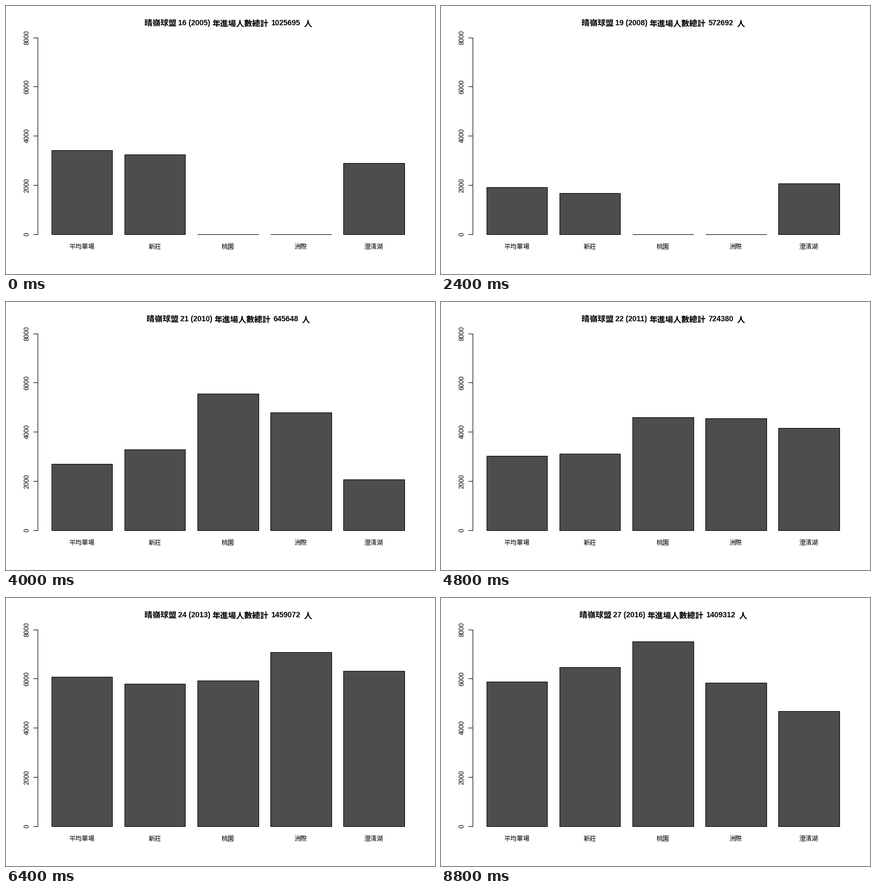
A matplotlib script that plays this animation: 800x500 px, repeating every 9600 ms.

```python
import math

import matplotlib.pyplot as plt
import numpy as np
from matplotlib.animation import FuncAnimation
from matplotlib.patches import Rectangle

WIDTH, HEIGHT, DPI = 800, 500, 100
PX = 72 / DPI  # points per pixel
LATIN = "Liberation Sans"
CJK = "Noto Sans CJK JP"
LEAGUE = "晴嶺球盟"
FIRST_YEAR, FIRST_SEASON = 2005, 16

TOTALS = [1025695, 706858, 655461, 572692, 899491, 645648,
          724380, 583805, 1459072, 1224730, 1326895, 1409312]

# Crowd at each park relative to the season average, at a few key years.
# A shorter list means the park opened later.
KEY_YEARS = [2005, 2008, 2010, 2012, 2013, 2014, 2016]
PARKS = {
    "新莊": [0.949, 0.878, 1.222, 0.842, 0.953, 0.811, 1.101],
    "桃園": [2.064, 0.976, 0.974, 1.224, 1.279],
    "洲際": [1.781, 1.235, 1.164, 0.905, 0.994],
    "澄清湖": [0.848, 1.083, 0.769, 1.987, 1.039, 0.862, 0.797],
}

LINE = 14.4  # height of one margin line
LEFT, RIGHT = 4.1 * LINE, WIDTH - 2.1 * LINE
TOP, BOTTOM = 4.1 * LINE, HEIGHT - 5.1 * LINE
UNIT = (RIGHT - LEFT) / 6.264  # width of one bar


def y_of(value):
    return math.floor(BOTTOM - value * (BOTTOM - TOP) / 8000)


def bar_edges(index):
    left = LEFT + UNIT * (0.232 + 1.2 * index)
    return math.floor(left), math.floor(left + UNIT)


def crowds(year, total):
    """Season average followed by the crowd at each park."""
    average = total / (300 if year < 2009 else 240)
    ratios = [np.interp(year, KEY_YEARS[-len(park):], park, left=0)
              for park in PARKS.values()]
    return [average] + [average * ratio for ratio in ratios]


fig = plt.figure(figsize=(WIDTH / DPI, HEIGHT / DPI), dpi=DPI, facecolor="white")
ax = fig.add_axes([0, 0, 1, 1])
ax.set(xlim=(0, WIDTH), ylim=(HEIGHT, 0))
ax.axis("off")


def write(x, y, text, size, font, **style):
    return ax.text(x, y, text, fontsize=size * PX, family=font,
                   va="baseline", color="black", **style)


def stroke(xs, ys):
    # Snapping moves whole coordinates to pixel centres.
    ax.plot(xs, ys, color="black", lw=PX, snap=True,
            solid_capstyle="projecting")


axis_x = math.floor(LEFT)
stroke([axis_x, axis_x], [y_of(8000), y_of(0)])
for tick in range(0, 8001, 2000):
    y = y_of(tick)
    stroke([math.floor(LEFT - LINE / 2), axis_x], [y, y])
    write(42.5, y, str(tick), 12, LATIN, ha="center", rotation=90,
          rotation_mode="anchor")

bars = []
for i, label in enumerate(["平均單場", *PARKS]):
    x0, x1 = bar_edges(i)
    bar = Rectangle((x0, y_of(0)), x1 - x0, 0, facecolor="#4d4d4d",
                    edgecolor="black", lw=PX, snap=True, joinstyle="miter")
    bars.append(ax.add_patch(bar))
    write((x0 + x1) / 2, 453, label, 12, CJK, ha="center")


def title_part(font):
    size, y = (14, 36) if font == LATIN else (15, 37)
    return write(0, y, "", size, font, ha="left", weight="bold")


title = [title_part(font) for font in (CJK, LATIN, CJK, LATIN, CJK)]


def set_title(index, total):
    parts = [LEAGUE, f"{FIRST_SEASON + index} ({FIRST_YEAR + index})",
             "年進場人數總計", str(total), "人"]
    missing = 7 - len(parts[3])
    starts = [258, 321, 384.5, 494.5, 556 - 8 * missing]
    for artist, text, x in zip(title, parts, starts):
        artist.set_text(text)
        artist.set_x(x + 4 * missing)


def update(index):
    total = TOTALS[index]
    for bar, value in zip(bars, crowds(FIRST_YEAR + index, total)):
        top = y_of(value)
        bar.set_y(top)
        bar.set_height(y_of(0) - top)
    set_title(index, total)
    return bars + title


animation = FuncAnimation(fig, update, frames=len(TOTALS), interval=800,
                          repeat=True, repeat_delay=0)
plt.show()
```
